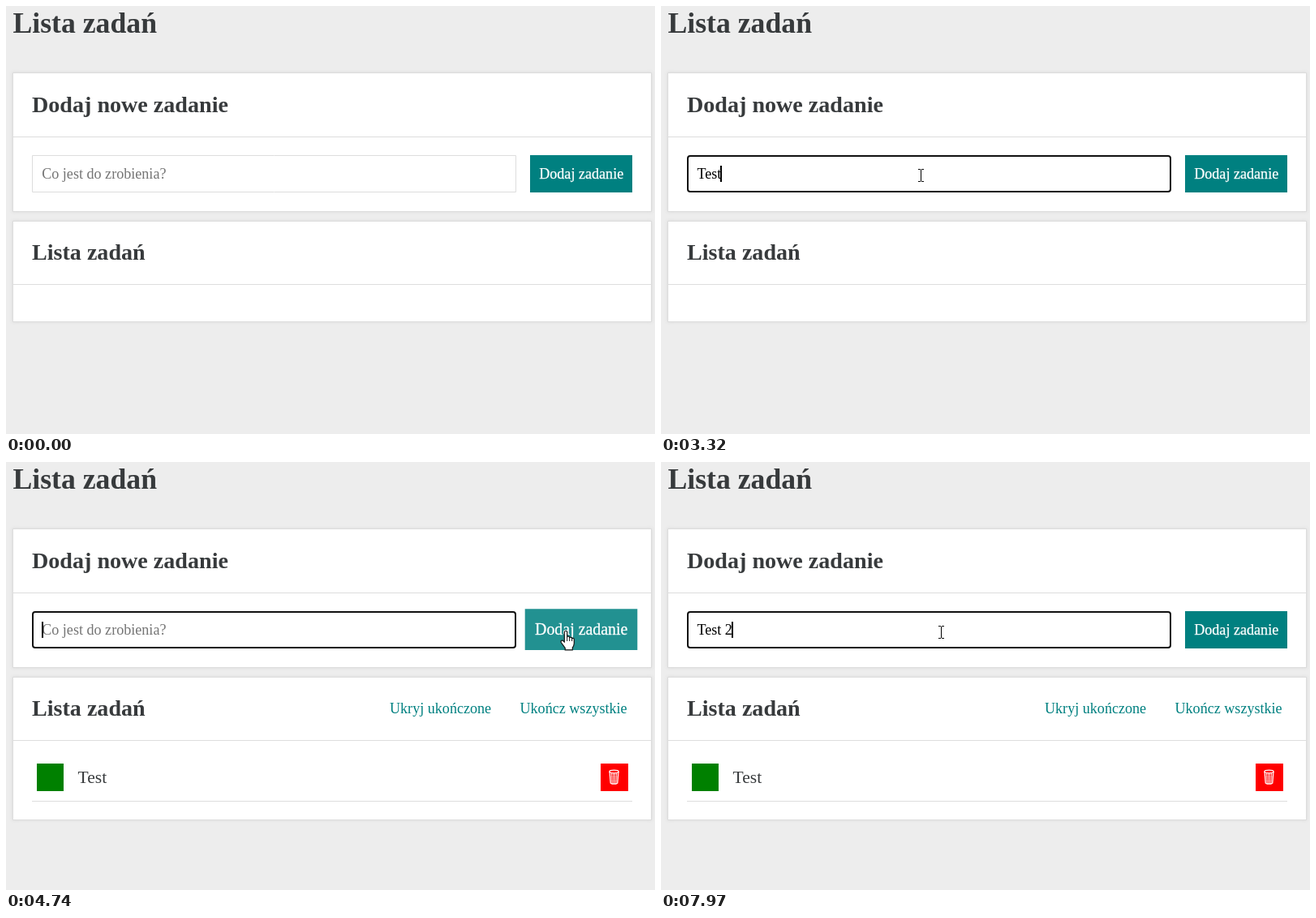
An HTML page with a canvas for the animation above (8 s loop, 800 by 528 pixels).

```html
<!DOCTYPE html>
<html lang="pl">
<head>
<meta charset="utf-8">
<title>Lista zadań</title>
<style>
  html, body { margin: 0; width: 100%; height: 100%; overflow: hidden; background: #ededed; }
  canvas { display: block; width: 800px; height: 528px; }
</style>
</head>
<body>
<canvas id="stage" width="800" height="528"></canvas>
<script>
const ctx = document.getElementById('stage').getContext('2d');
const LOOP = 8000;
const STEP = 100;
const BLINK = 510;
const SERIF = '"Liberation Serif", "Times New Roman", serif';
const SIZE = 18.1;
const TEAL = '#008080';
const DARK = '#373a3c';
const LINE = '#ddd';

const FOCUS = 1100, PRESS = 4640, ADDED = 4740;
const HOVER_IN = 4200, HOVER_OUT = 4815, HOVER_TIME = 500;

const words = [
  { text: 'Test', keys: [2100, 2320, 2620, 2820], until: ADDED },
  { text: 'Test 2', keys: [6250, 6650, 6850, 6950, 7350, 7970], until: LOOP },
];

// Curved pointer moves: start time, duration, start, bend, end.
const REST = [320, 209], BUTTON = [690, 207];
const moves = [
  { start: 180, time: 600, from: [553, 467], bend: [400, 270], to: REST },
  { start: 3840, time: 700, from: REST, bend: [505, 242], to: BUTTON },
  { start: 4840, time: 400, from: BUTTON, bend: [517, 238], to: [345, 210] },
];

const clamp = x => Math.min(1, Math.max(0, x));
const easeOut = x => 1 - (1 - clamp(x)) ** 3;
const hold = (t, start) => start + Math.floor((t - start) / STEP) * STEP;

// CSS "ease" timing curve.
function ease(x) {
  let lo = 0, hi = 1;
  for (let i = 0; i < 20; i++) {
    const u = (lo + hi) / 2;
    if (0.75 * u * (1 - u) + u ** 3 < clamp(x)) lo = u; else hi = u;
  }
  return 0.3 * lo * (1 - lo) ** 2 + 3 * lo * lo * (1 - lo) + lo ** 3;
}

function pointerAt(t) {
  const move = moves.filter(m => m.start <= t).pop();
  if (!move) return null;
  const { start, time, from, bend, to } = move;
  const p = easeOut((hold(t, start) - start) / time), q = 1 - p;
  return from.map((a, i) => q * q * a + 2 * p * q * bend[i] + p * p * to[i]);
}

function hoverAt(t) {
  const held = hold(t, moves[1].start);
  return ease((held - HOVER_IN) / HOVER_TIME) - ease((held - HOVER_OUT) / HOVER_TIME);
}

function typedAt(t) {
  const word = words.find(w => t < w.until);
  return word.text.slice(0, word.keys.filter(k => k <= t).length);
}

// The blink restarts with each focus and each key.
function caretAt(t) {
  const resets = [FOCUS, ADDED, ...words.flatMap(w => w.keys)].filter(k => k <= t);
  return resets.length > 0 && Math.floor((t - Math.max(...resets)) / BLINK) % 2 === 0;
}

function rect(x, y, w, h, color) {
  ctx.fillStyle = color;
  ctx.fillRect(x, y, w, h);
}

function text(str, x, y, size, color, weight = '') {
  ctx.font = `${weight} ${size}px ${SERIF}`;
  ctx.fillStyle = color;
  ctx.fillText(str, x, y);
}

function stroke(color, width) {
  ctx.strokeStyle = color;
  ctx.lineWidth = width;
  ctx.stroke();
}

function path(points, close) {
  ctx.beginPath();
  points.forEach(([x, y]) => ctx.lineTo(x, y));
  if (close) ctx.closePath();
}

function panel(y, h, split, title) {
  ctx.save();
  ctx.shadowColor = '#d8d8d8';
  ctx.shadowBlur = 4;
  rect(8, y, 788, h, LINE);
  ctx.restore();
  rect(9, y + 1, 786, h - 2, '#fff');
  rect(9, split, 786, 1, LINE);
  text(title, 32, split - 30, 28.1, DARK, 'bold');
}

function field(value, focused, caret) {
  ctx.beginPath();
  if (focused) {
    ctx.roundRect(33, 185, 595, 44, 3);
    stroke('#101010', 2);
  } else {
    ctx.rect(32.5, 184.5, 596, 45);
    stroke(LINE, 1);
  }
  if (value) text(value, 44.4, 213, SIZE, '#000');
  else text('Co jest do zrobienia?', 44.2, 213, SIZE, '#757575');
  if (focused && caret) {
    ctx.font = `${SIZE}px ${SERIF}`;
    rect(Math.max(44, Math.floor(43.8 + ctx.measureText(value).width)), 197, 2, 20, '#000');
  }
}

function addButton(hover, pressed) {
  const scale = 1 + 0.1 * hover;
  const inset = pressed ? 1.1 : 0;
  ctx.save();
  ctx.translate(709, hover > 0 ? 206.6 : 207);
  ctx.scale(scale, scale);
  ctx.beginPath();
  ctx.roundRect(inset - 63, inset - 23, 126 - 2 * inset, 46 - 2 * inset, inset);
  ctx.globalAlpha = 1 - 0.135 * hover;
  ctx.fillStyle = TEAL;
  ctx.fill();
  ctx.globalAlpha = 1;
  text('Dodaj zadanie', -51.8, 6, SIZE, '#fff');
  ctx.strokeStyle = '#fff';
  ctx.lineWidth = 0.25;
  ctx.strokeText('Dodaj zadanie', -51.8, 6);
  ctx.restore();
}

function bin() {
  ctx.beginPath();
  ctx.ellipse(749.5, 382, 5.6, 1.8, 0, 0, Math.PI * 2);
  stroke('#fff', 1.2);
  path([[744, 382], [745.2, 396], [747, 397.2], [752, 397.2], [753.8, 396], [755, 382]]);
  stroke('#fff', 1.2);
  for (let i = -1; i <= 1; i++) {
    path([[749.5 + i * 2.8, 384], [749.5 + i * 2.2, 397]]);
    stroke('#fff', 0.9);
  }
  for (let y = 386; y < 397; y += 2.5) {
    path([[744.6, y], [754.4, y]]);
    stroke('#fff', 0.5);
  }
}

function task() {
  text('Ukryj ukończone', 473, 310, SIZE, TEAL);
  text('Ukończ wszystkie', 633.5, 310, SIZE, TEAL);
  rect(38, 372, 33, 34, '#008000');
  text('Test', 88.6, 396, 21.6, DARK);
  rect(733, 372, 34, 34, '#f00');
  bin();
  rect(32, 418, 740, 1, LINE);
}

function arrow() {
  path([[0, 0], [0, 16.5], [3.8, 13], [6.3, 18.6], [8.7, 17.5], [6.3, 12], [11.5, 12]], true);
  ctx.fillStyle = '#fff';
  ctx.fill();
  stroke('#000', 1);
}

function beam() {
  rect(0, -7, 1, 14, '#000');
  for (const y of [-8, 7]) {
    rect(-3, y, 3, 1, '#000');
    rect(1, y, 3, 1, '#000');
  }
}

function hand() {
  ctx.beginPath();
  ctx.moveTo(-1.7, 15);
  ctx.lineTo(-1.7, 2.5);
  ctx.quadraticCurveTo(0, 0, 1.7, 2.5);
  ctx.lineTo(1.7, 8.5);
  ctx.quadraticCurveTo(3.5, 7.2, 4.9, 9.4);
  ctx.quadraticCurveTo(6.5, 8.4, 7.9, 10.6);
  ctx.quadraticCurveTo(10.3, 9.6, 10.3, 12.5);
  ctx.lineTo(10.3, 17);
  ctx.quadraticCurveTo(10, 20, 8.3, 22);
  ctx.lineTo(8.3, 24.8);
  ctx.lineTo(-0.8, 24.8);
  ctx.lineTo(-0.8, 22.5);
  ctx.lineTo(-5.8, 15.5);
  ctx.quadraticCurveTo(-6.4, 12.8, -4, 13);
  ctx.closePath();
  ctx.fillStyle = '#fff';
  ctx.fill();
  stroke('#111', 1.2);
  for (const x of [1.7, 4.7, 7.6]) {
    path([[x, 9], [x, 14]]);
    stroke('#111', 1);
  }
}

function pointer(pos) {
  if (!pos) return;
  const [x, y] = pos.map(Math.round);
  const inRow = y > 183 && y < 230;
  ctx.save();
  ctx.translate(x, y);
  if (inRow && x > 32 && x < 629) beam();
  else if (inRow && x > 640 && x < 778) hand();
  else arrow();
  ctx.restore();
}

function draw(t) {
  const added = t >= ADDED;
  const pressed = t >= PRESS && !added;

  ctx.fontKerning = 'normal';
  rect(0, 0, 800, 528, '#ededed');
  text('Lista zadań', 8.5, 33, 35.7, DARK, 'bold');
  panel(82, 172, 161, 'Dodaj nowe zadanie');
  panel(265, added ? 177 : 125, 343, 'Lista zadań');
  field(typedAt(t), t >= FOCUS && !pressed, caretAt(t));
  addButton(hoverAt(t), pressed);
  if (added) task();
  pointer(pointerAt(t));
}

let origin = null;
function tick(now) {
  origin ??= now;
  draw((now - origin) % LOOP);
  requestAnimationFrame(tick);
}
draw(0);
requestAnimationFrame(tick);
</script>
</body>
</html>
```
